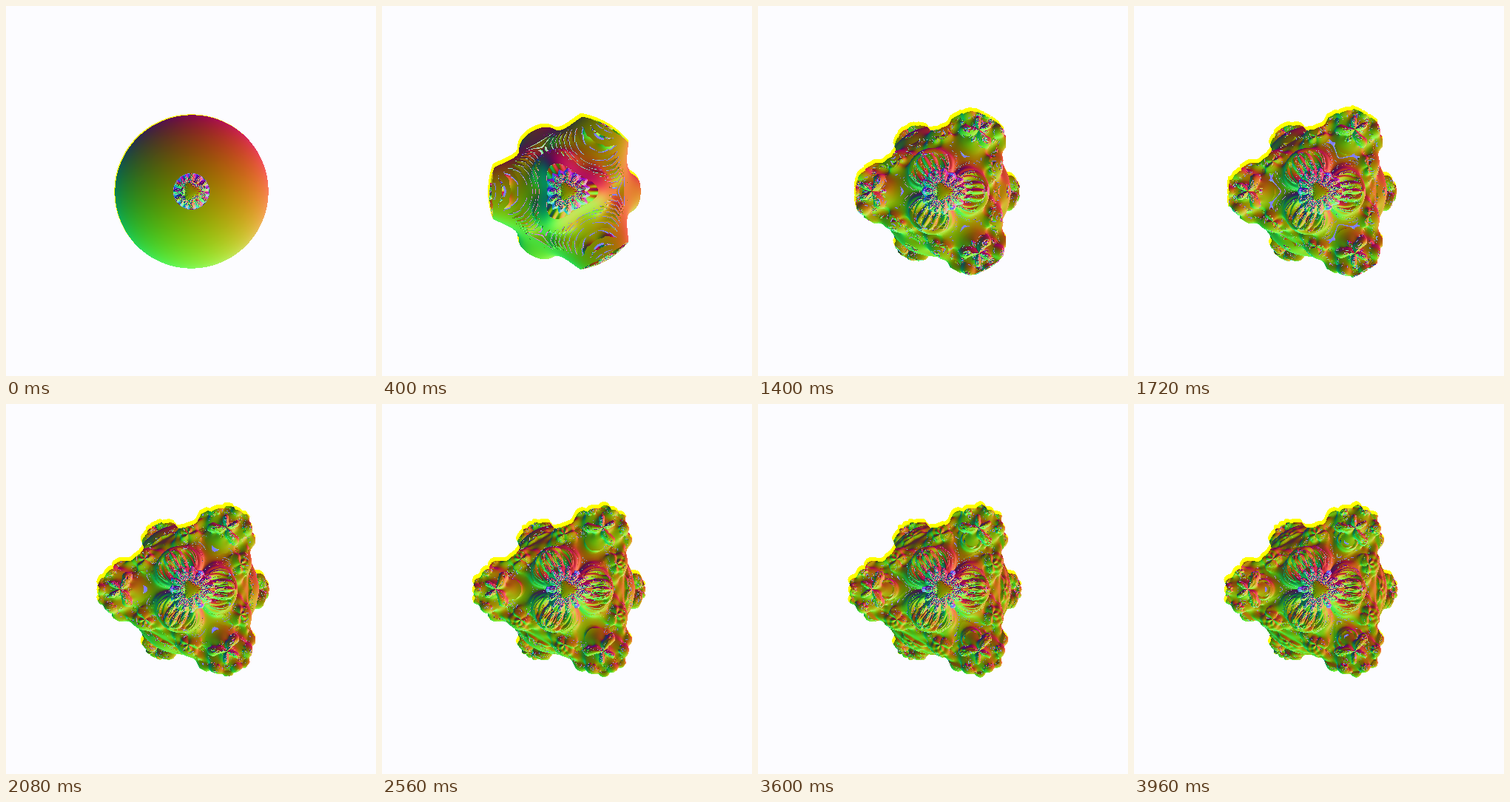
Write an HTML page with a canvas that moves like this. It is 500 by 500 pixels and loops after 4000 ms.

```html
<!DOCTYPE html>
<html lang="en">
<head>
<meta charset="utf-8">
<title>Growing bulb</title>
<style>
  html, body { margin: 0; width: 100%; height: 100%; overflow: hidden; background: #fcfcff; }
  canvas { display: block; width: 500px; height: 500px; }
</style>
</head>
<body>
<canvas width="500" height="500"></canvas>
<script>
const ctx = document.querySelector('canvas').getContext('2d');
const FRAMES = 100, FRAME_MS = 40;
const LEFT = 110, SIZE = 280, CENTER = 250;
const CAMERA = 5, FOCAL = 500, FAR = 7;
const EPS = 0.01, DELTA = 0.001;
const ITERATIONS = 15, MAX_STEPS = 80;
const BACKGROUND = [252, 252, 255], RIM = [255, 255, 0];

// Distance estimate for the power-4 bulb, without trigonometry.
function distance(cx, cy, cz, bailout) {
  let x = cx, y = cy, z = cz, dr = 1, r = 0;
  for (let i = 0; i < ITERATIONS; i++) {
    const xx = x * x, yy = y * y, zz = z * z, q = xx + yy;
    r = Math.sqrt(q + zz);
    if (r > bailout) break;
    dr = 4 * r * r * r * dr + 1;
    const k = 4 * z * (zz - q) / (q * Math.sqrt(q) + 1e-30);
    const nx = k * (xx * xx - 6 * xx * yy + yy * yy);
    const ny = k * 4 * x * y * (xx - yy);
    z = zz * zz - 6 * zz * q + q * q + cz;
    x = nx + cx;
    y = ny + cy;
  }
  return 0.5 * Math.log(r + 1e-12) * r / dr;
}

// Colour of the surface normal seen along one ray, or null for a miss.
function trace(px, py, bailout) {
  const len = Math.hypot(px, py, FOCAL);
  const dx = px / len, dy = py / len, dz = FOCAL / len;
  let t = 0;
  for (let step = 0; step < MAX_STEPS && t < FAR; step++) {
    const x = dx * t, y = dy * t, z = dz * t - CAMERA;
    const d = distance(x, y, z, bailout);
    if (d < EPS) {
      const nx = distance(x + DELTA, y, z, bailout) - d;
      const ny = distance(x, y + DELTA, z, bailout) - d;
      const nz = distance(x, y, z + DELTA, bailout) - d;
      const scale = 127.5 / (Math.hypot(nx, ny, nz) || 1);
      return [127.5 + nx * scale, 127.5 + ny * scale, 127.5 + nz * scale];
    }
    t += d;
  }
  return null;
}

function render(frame) {
  const bailout = 1 + frame * 0.005;
  const image = ctx.createImageData(SIZE, SIZE);
  const colors = new Array(SIZE * SIZE);
  for (let y = 0; y < SIZE; y++)
    for (let x = 0; x < SIZE; x++)
      colors[y * SIZE + x] = trace(x + LEFT - CENTER, y + LEFT - CENTER, bailout);

  // Bright rim along the upper left edge of the silhouette.
  const rimX = frame < 4 ? 1 : 2, rimY = Math.min(5, 1 + Math.floor(frame / 2));
  const shift = rimY * SIZE + rimX;
  colors.forEach((color, i) => {
    const shown = !color ? BACKGROUND : colors[i - shift] ? color : RIM;
    image.data.set([...shown, 255], i * 4);
  });
  return image;
}

const cache = [];
let shownFrame = -1;

function draw(now) {
  const frame = Math.floor(now / FRAME_MS) % FRAMES;
  if (frame !== shownFrame) {
    cache[frame] ||= render(frame);
    ctx.putImageData(cache[frame], LEFT, LEFT);
    shownFrame = frame;
  }
  requestAnimationFrame(draw);
}
draw(0);
</script>
</body>
</html>
```
